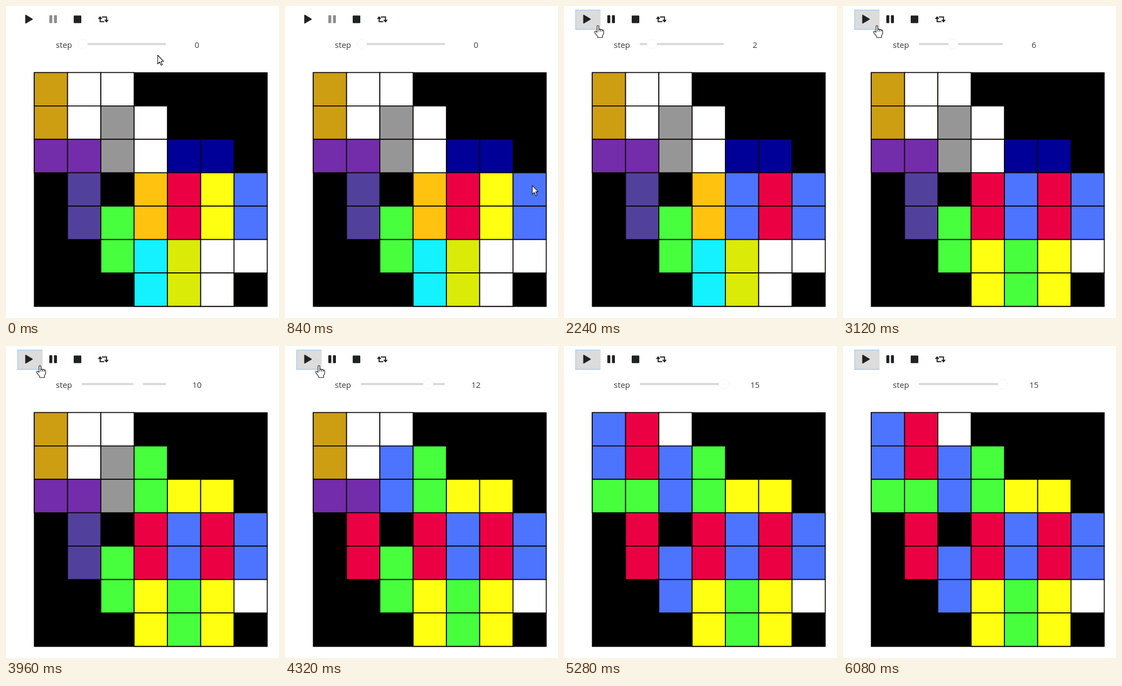
An HTML page for the animation above (6.12 s loop, 504 px wide and 574 px high).

```html
<!DOCTYPE html>
<html lang="en">
<head>
<meta charset="utf-8">
<title>Grid colouring steps</title>
<style>
  html, body { margin: 0; width: 100%; height: 100%; overflow: hidden; background: #fff; }
  svg { display: block; width: 504px; height: 574px; }
  text { font: 15px "Open Sans", "Noto Sans", sans-serif; fill: #3a3a3a; }
  .icon { fill: #1f2224; }
  .line { fill: none; stroke: #1f2224; stroke-width: 2; }
  #cells rect { stroke: #080404; stroke-width: 1.7; }
  .pointer path { fill: #fff; stroke: #111; stroke-width: 1.1; stroke-linejoin: round; }
  .pointer .crease { fill: none; stroke-width: 1; }
</style>
</head>
<body>
<svg viewBox="0 0 504 574">
  <path id="hover" d="M24 43H66" stroke="#c8c8c8" stroke-width="1.5"/>
  <g id="pressed">
    <rect x="21" y="7" width="46.5" height="36.5" fill="#dcdcdc"/>
    <path d="M67 7.5H21.5V43H67" fill="none" stroke="#a6cdf3" stroke-width="1.4"/>
  </g>
  <path class="icon" d="M35.5 17.2Q35.5 15.6 37 16.3L49 23.4Q50 24.2 49 25L37 32Q35.5 32.700 35.500 31.200Z"/>
  <g id="pause">
    <rect x="80" y="17" width="5.500" height="14.500" rx="1.200"/>
    <rect x="88.500" y="17" width="5.500" height="14.500" rx="1.200"/>
  </g>
  <rect class="icon" x="125" y="17.500" width="14" height="14" rx="1.300"/>
  <path class="line" d="M173.800 22V28.700H181.500M177 20.300H185.500V27"/>
  <path class="icon" d="M169.500 23.700L173.800 18.700L178 23.700ZM181.200 25.500L185.500 30.500L189.700 25.500Z"/>

  <text x="92" y="76.500">step</text>
  <rect x="140" y="68" width="155" height="4" rx="1" fill="#dadada"/>
  <circle id="thumb" cy="70" r="9" fill="#fff" stroke="#f1f1f1" stroke-width=".8"/>
  <text id="count" x="352.500" y="76.500" text-anchor="middle">0</text>

  <rect x="51.500" y="122" width="431.500" height="431.500"/>
  <g id="cells"></g>

  <g class="pointer" id="arrow">
    <path d="M.5 .5V16.500L4.200 13L6.800 19L9.300 18L6.700 12H11.500Z"/>
  </g>
  <g class="pointer" id="hand">
    <path d="M-1.500 12.500V2.200a1.600 1.600 0 0 1 3.300 0V7.800q1.700-1.300 3.200.2q1.700-1 3.100.6q2.300-.6 2.600 1.900V15.500L8.700 18.500V22.500H-.5V20.500L-5.500 13.800Q-6.700 11.400-4.600 11Q-3.200 10.900-1.500 13Z"/>
    <path class="crease" d="M1.800 7.800V11.500M5 8V11.500M8.100 8.600V11.500"/>
  </g>
</svg>
<script>
const LOOP = 6120, START = 1800, STEP_MS = 200, LAST = 15;
const PRESS = 1760, CELL = 61.45, LEFT = 52.2, TOP = 122.4;
const blue = "#4d74ff", red = "#ec0044", green = "#47ff3d", yellow = "#ffff12";

// column, row, width, height, first colour, later colour, step of the change
const tiles = [
  [0, 0, 1, 2, "#cd9e12", blue, 14.9],
  [1, 0, 1, 2, "#fff", red, 15.9],
  [2, 0, 1, 1, "#fff"],
  [2, 1, 1, 2, "#969696", blue, 10.9],
  [3, 1, 1, 2, "#fff", green, 8],
  [0, 2, 2, 1, "#732caa", green, 12.9],
  [4, 2, 2, 1, "#000099", yellow, 9],
  [1, 3, 1, 2, "#52419c", red, 11.9],
  [2, 4, 1, 2, green, blue, 13.9],
  [3, 3, 1, 2, "#ffc20e", red, 3],
  [4, 3, 1, 2, red, blue, 2],
  [5, 3, 1, 2, yellow, red, 1],
  [6, 3, 1, 2, blue],
  [3, 5, 1, 2, "#14f1ff", yellow, 5],
  [4, 5, 1, 2, "#daeb08", green, 4],
  [5, 5, 1, 2, "#fff", yellow, 6],
  [6, 5, 1, 1, "#fff"]
];

// time, x, y of the pointer's hot spot
const path = [
  [0, 279.5, 90], [400, 472, 340], [680, 472, 340], [760, 480, 350],
  [1280, 113, 42], [1500, 65, 38.5], [1600, 65, 38.5], [1720, 62.5, 35.5],
  [4480, 62.5, 35.5], [4680, 51, -26], [LOOP, 51, -26]
];

const $ = id => document.getElementById(id);
const show = (id, on) => $(id).setAttribute("visibility", on ? "visible" : "hidden");

const drawn = tiles.map(([col, row, w, h, from, to, at]) => {
  const group = document.createElementNS("http://www.w3.org/2000/svg", "g");
  for (let x = col; x < col + w; x++) {
    for (let y = row; y < row + h; y++) {
      const cell = document.createElementNS(group.namespaceURI, "rect");
      cell.setAttribute("x", LEFT + x * CELL);
      cell.setAttribute("y", TOP + y * CELL);
      cell.setAttribute("width", CELL);
      cell.setAttribute("height", CELL);
      group.append(cell);
    }
  }
  $("cells").append(group);
  return { group, from, to, at };
});

function pointerAt(t) {
  const i = path.findIndex(p => p[0] > t);
  const [t0, x0, y0] = path[i - 1], [t1, x1, y1] = path[i];
  const k = (t - t0) / (t1 - t0), e = k * k * (3 - 2 * k);
  return [x0 + (x1 - x0) * e, y0 + (y1 - y0) * e];
}

function render(t) {
  const progress = (t - START) / STEP_MS;
  const step = Math.max(0, Math.min(LAST, Math.floor(progress)));
  for (const { group, from, to, at } of drawn) {
    group.setAttribute("fill", to && progress >= at ? to : from);
  }
  $("thumb").setAttribute("cx", 142 + step * 10.2);
  $("count").textContent = step;

  const pressed = t >= PRESS;
  const [x, y] = pointerAt(t);
  const over = x < 67 && y < 43;
  show("pressed", pressed);
  show("hover", over && !pressed);
  $("pause").setAttribute("fill", pressed ? "#1f2224" : "#8e8e8e");

  show("arrow", !over);
  show("hand", over);
  $(over ? "hand" : "arrow").setAttribute("transform", `translate(${x} ${y})`);
}

const begin = performance.now();
function tick() {
  render((performance.now() - begin) % LOOP);
  requestAnimationFrame(tick);
}
tick();
</script>
</body>
</html>
```
